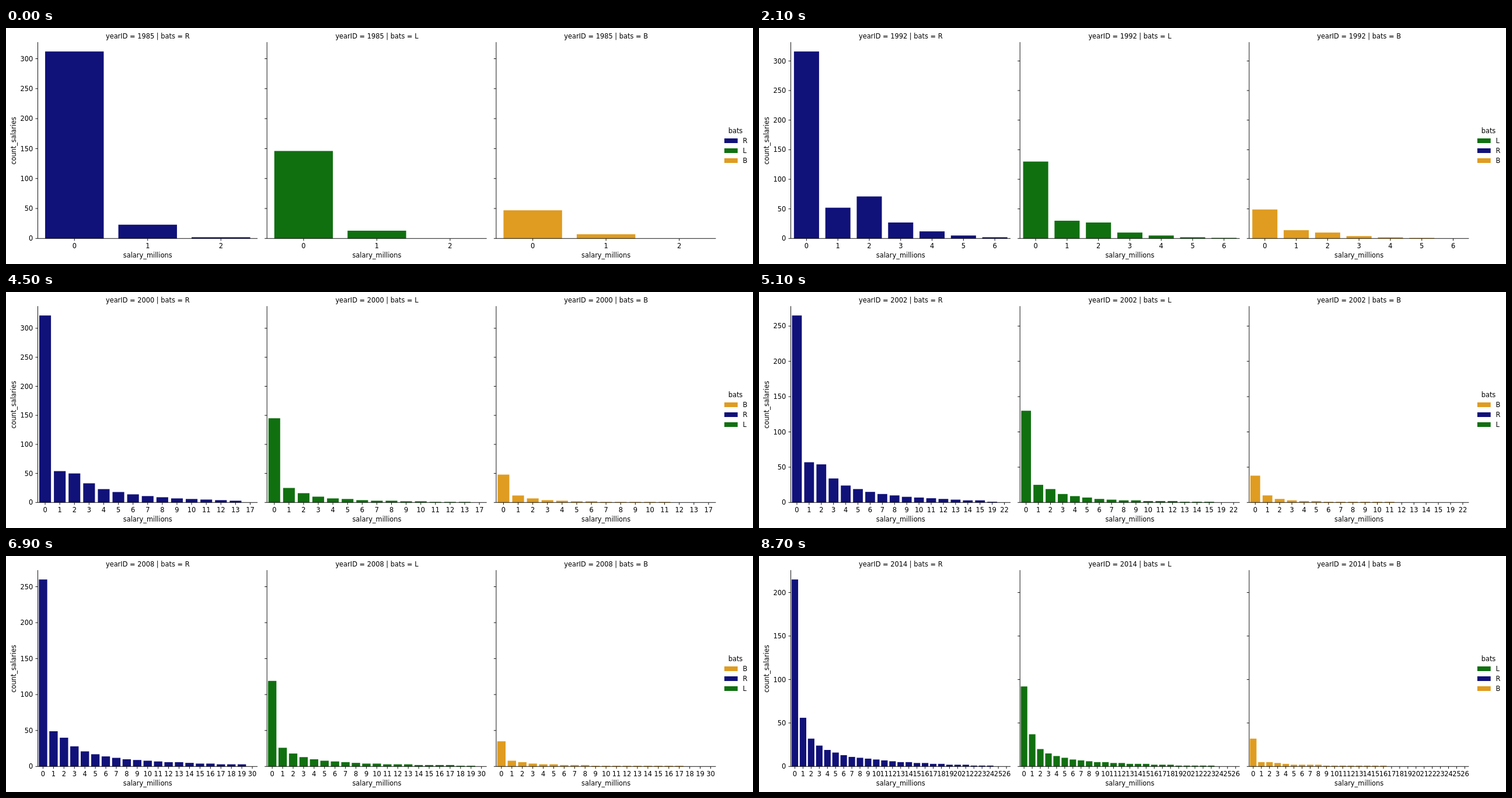
An HTML page that plays this animation: 1280 px wide and 404 px high, repeating every 9 s.

```html
<!DOCTYPE html>
<html lang="en">
<head>
<meta charset="utf-8">
<title>Salaries by batting side</title>
<style>
html, body { margin: 0; width: 100%; height: 100%; overflow: hidden; background: #fff; }
svg { display: block; width: 100vw; height: 100vh; }
text { font: 11.4px "DejaVu Sans", Verdana, sans-serif; fill: #000; white-space: pre; }
.mid { text-anchor: middle; }
.end { text-anchor: end; }
.axis { stroke: #000; stroke-width: .92; fill: none; }
</style>
</head>
<body>
<svg id="chart" viewBox="0 0 1280 404" xmlns="http://www.w3.org/2000/svg"></svg>
<script>
const STEP = 300, FIRST = 1985, LAST = 2014;
const BASE = 360.3, TOP = 24.2, LEFT = 54.5, PITCH = 392.7, WIDTH = 376.5;
const SIDES = ['R', 'L', 'B'];
const COLORS = { R: '#11117a', L: '#107010', B: '#df9c20' };
const chart = document.getElementById('chart');

// Key years: the unbroken categories end at `run`, `rest` follows after gaps.
// Each side gives its first three bars; `decay` shapes the tail behind them.
// `ease` bends the approach from the key year before.
const keys = [
  { year: 1985, run: 2, rest: [], order: 'RLB', decay: 1.8, ease: 1,
    R: [312, 23, 2], L: [146, 13, 0], B: [47, 7, 0] },
  { year: 1992, run: 6, rest: [], order: 'LRB', decay: 1.8, ease: 3,
    R: [316, 52, 71], L: [130, 30, 27], B: [49, 14, 10] },
  { year: 1997, run: 10, rest: [], order: 'BLR', decay: .8, ease: 1,
    R: [407, 50, 45], L: [167, 24, 11], B: [63, 14, 9] },
  { year: 2002, run: 15, rest: [19, 22], order: 'BRL', decay: 1, ease: 1,
    R: [265, 57, 54], L: [130, 25, 19], B: [38, 10, 5] },
  { year: 2005, run: 19, rest: [22, 26], order: 'RLB', decay: .9, ease: 1,
    R: [279, 41, 47], L: [123, 24, 19], B: [40, 6, 8] },
  { year: 2010, run: 20, rest: [22, 24, 33], order: 'BRL', decay: .75, ease: 1,
    R: [248, 55, 36], L: [116, 28, 18], B: [31, 9, 5] },
  { year: 2014, run: 26, rest: [], order: 'LRB', decay: .65, ease: 1,
    R: [215, 56, 32], L: [92, 37, 20], B: [32, 5, 5] },
];

const mix = (a, b, t) => a + (b - a) * t;
const topOf = key => key.rest.at(-1) ?? key.run;

// Power law from the third bar on, running out at the highest salary.
const tail = (third, v, decay, top) =>
  third * (v / 2) ** -decay * (1 - (v - 2) / (top - 1));

function dataFor(year) {
  const n = Math.max(1, keys.findIndex(k => k.year >= year));
  const a = keys[n - 1], b = keys[n];
  const part = (year - a.year) / (b.year - a.year);
  const t = part ** b.ease;
  const near = part < .5 ? a : b;
  const top = Math.floor(mix(topOf(a), topOf(b), t));
  const run = Math.min(top, Math.floor(mix(a.run, b.run, t)));
  const rest = year === near.year ? near.rest : top > run ? [top] : [];
  const cats = [...Array(run + 1).keys(), ...rest];
  const decay = mix(a.decay, b.decay, t);
  const rows = SIDES.map(side => {
    const head = a[side].map((v, i) => mix(v, b[side][i], t));
    return cats.map(v => Math.round(v < 3 ? head[v] : tail(head[2], v, decay, top)));
  });
  return { cats, rows, order: near.order };
}

const text = (x, y, s, cls = '') => `<text x="${x}" y="${y}" class="${cls}">${s}</text>`;
const rect = (x, y, w, h, fill) =>
  `<rect x="${x}" y="${y}" width="${w}" height="${h}" fill="${fill}"/>`;

function panel(year, s, { cats, rows }) {
  const x0 = LEFT + PITCH * s, mid = x0 + WIDTH / 2, slot = WIDTH / cats.length;
  const limit = Math.max(...rows.flat()) * 1.05;
  const unit = (BASE - TOP) / limit;
  let out = '', lines = `M${x0} ${TOP}V${BASE}H${x0 + WIDTH}`;
  cats.forEach((c, i) => {
    const x = x0 + slot * (i + .5), h = rows[s][i] * unit;
    if (h) out += rect(x - slot * .4, BASE - h, slot * .8, h, COLORS[SIDES[s]]);
    lines += `M${x} ${BASE}v4`;
    out += text(x, 377, c, 'mid');
  });
  for (let v = 0; v <= limit; v += 50) {
    const y = BASE - v * unit;
    lines += `M${x0} ${y}h-4`;
    if (s === 0) out += text(46.3, y + 4.1, v, 'end');
  }
  return out + `<path class="axis" d="${lines}"/>` +
    text(mid, 18, `yearID = ${year} | bats = ${SIDES[s]}`, 'mid') +
    text(mid, 393.4, 'salary_millions', 'mid');
}

function legend(order) {
  return text(1250, 180, 'bats', 'mid') + [...order].map((side, i) =>
    rect(1230.9, 189 + i * 17, 22.8, 8, COLORS[side]) +
    text(1262.4, 197.2 + i * 17, side)).join('');
}

function draw(year) {
  const data = dataFor(year);
  chart.innerHTML = SIDES.map((_, s) => panel(year, s, data)).join('') +
    '<text class="mid" transform="translate(17.4 193) rotate(-90)">count_salaries</text>' +
    legend(data.order);
}

let shown = FIRST;
draw(shown);
const start = performance.now();
function tick(now) {
  const year = FIRST + Math.floor(Math.max(0, now - start) / STEP) % (LAST - FIRST + 1);
  if (year !== shown) draw(shown = year);
  requestAnimationFrame(tick);
}
requestAnimationFrame(tick);
</script>
</body>
</html>
```
